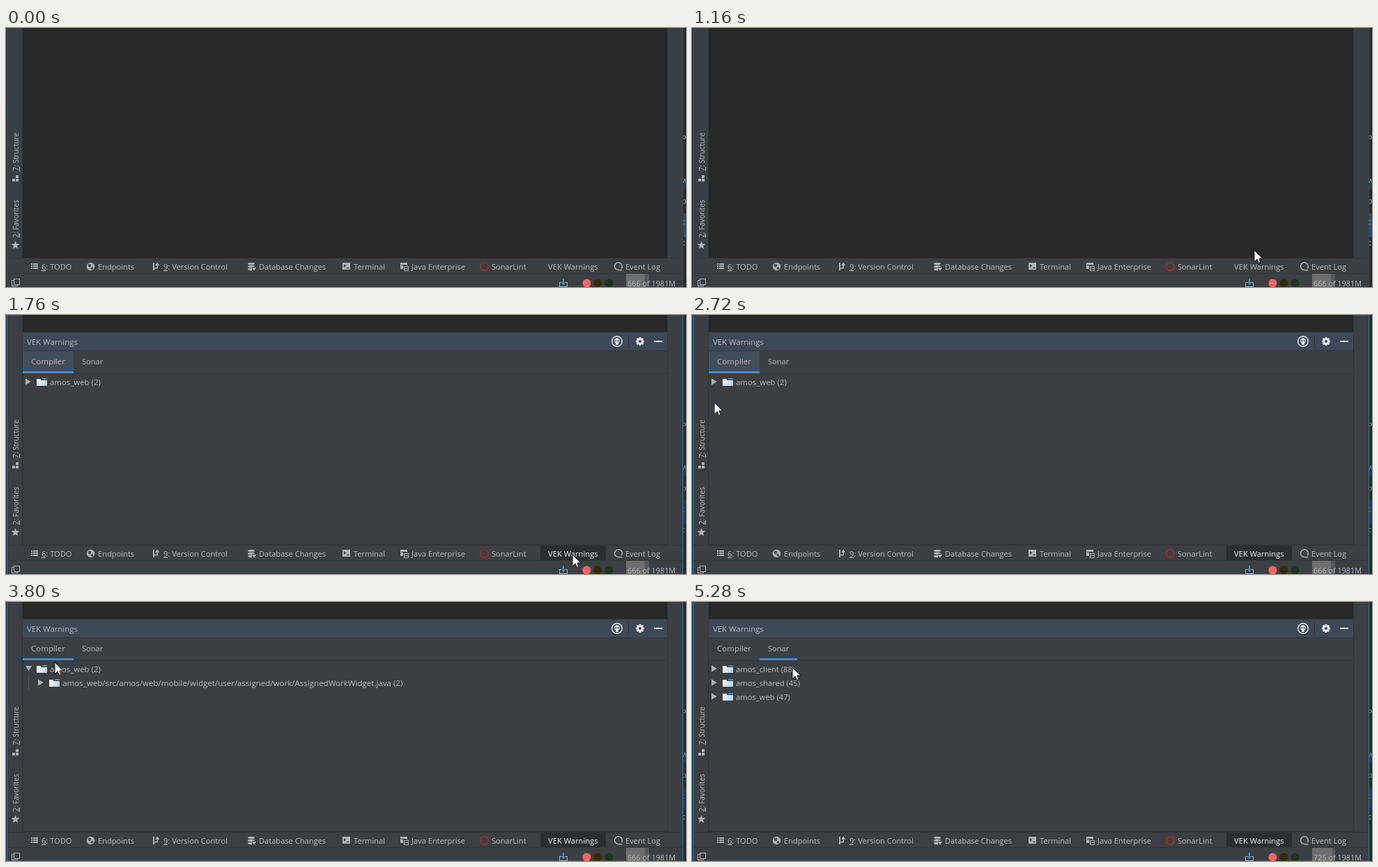
Recreate the animation shown at these times as an HTML page with a canvas. Size 976 by 373 pixels, loop 5400 ms.

```html
<!DOCTYPE html>
<html lang="en">
<head>
<meta charset="utf-8">
<title>Tool window demo</title>
<style>
  html, body { margin: 0; width: 100%; height: 100%; overflow: hidden; background: #282828; }
  canvas { display: block; width: 976px; height: 373px; }
</style>
</head>
<body>
<canvas id="stage" width="976" height="373"></canvas>
<script>
const ctx = document.getElementById('stage').getContext('2d');
const LOOP = 5400, STEP = 80;
const PANEL = '#3c3f41', EDITOR = '#282828', LINE = '#323436', HEADER = '#3c4856';
const TEXT = '#bbbbbb', ICON = '#afb1b3', LIGHT = '#e6e8ea', BLUE = '#3592c4';
const TITLE = 'VEK Warnings';

// What happens when
const APPEAR = 600, PRESS = 1680, SHOW = 1760, EXPAND = 3600, COUNT = 4560, SWITCH = 4800;
const clicks = [PRESS, EXPAND - STEP, SWITCH - STEP];

// Pointer moves: start, end and where each one leads
const entry = [950, 152];
const moves = [
  [520, 1080, 806, 308],
  [1080, 1160, 807, 320],
  [1160, 1520, 813, 345],
  [2160, 2720, 32, 126],
  [2720, 3000, 40, 93],
  [3080, 3240, 34, 94],
  [3560, 3800, 70, 87],
  [3800, 4000, 100, 71],
  [4040, 4280, 119, 65],
  [4880, 5120, 43, 88],
  [5120, 5280, 144, 94]
];

const smooth = u => u * u * (3 - 2 * u);

function pointerAt(t) {
  let [x, y] = entry;
  for (const [start, end, toX, toY] of moves) {
    if (t < start) break;
    const held = Math.floor((t - start) / STEP) * STEP;
    const u = t >= end ? 1 : smooth(held / (end - start));
    x += (toX - x) * u;
    y += (toY - y) * u;
  }
  return [Math.round(x), Math.round(y)];
}

function rect(x, y, w, h, color) {
  ctx.fillStyle = color;
  ctx.fillRect(x, y, w, h);
}

function frame(x, y, w, h, color) {
  ctx.strokeStyle = color;
  ctx.lineWidth = 1;
  ctx.strokeRect(x + 0.5, y + 0.5, w - 1, h - 1);
}

function disc(x, y, r, color, flat = 1) {
  ctx.fillStyle = color;
  ctx.beginPath();
  ctx.ellipse(x, y, r, r * flat, 0, 0, Math.PI * 2);
  ctx.fill();
}

function ring(x, y, r, color, from = 0, to = Math.PI * 2) {
  ctx.strokeStyle = color;
  ctx.lineWidth = 1.5;
  ctx.beginPath();
  ctx.arc(x, y, r, from, to);
  ctx.stroke();
}

function poly(points, color) {
  ctx.fillStyle = color;
  ctx.beginPath();
  points.forEach(p => ctx.lineTo(...p));
  ctx.closePath();
  ctx.fill();
}

// Triangle of half width r with its tip r ahead, turned by quarter turns
function triangle(x, y, r, turns, color) {
  at(x, y, turns * Math.PI / 2, () => poly([[0, -r], [0, r], [r * 1.6, 0]], color));
}

function at(x, y, angle, paint) {
  ctx.save();
  ctx.translate(x, y);
  ctx.rotate(angle);
  paint();
  ctx.restore();
}

// A leading shortcut digit is underlined
function label(text, x, y, size = 11.1, color = TEXT) {
  ctx.font = size + 'px "Open Sans", "Noto Sans", sans-serif';
  ctx.fillStyle = color;
  ctx.fillText(text, x, y);
  if (/^\d:/.test(text)) rect(x, y + 1, 6, 1, color);
}

function sideLabel(text, y) {
  at(18, y, -Math.PI / 2, () => label(text, 0, 0, 10.2));
}

function star(x, y, r) {
  poly(Array.from({ length: 10 }, (_, i) => {
    const a = (i / 5 - 0.5) * Math.PI, d = i % 2 ? r * 0.42 : r;
    return [x + d * Math.cos(a), y + d * Math.sin(a)];
  }), ICON);
}

function drawWindow(active) {
  const border = active ? '#2f78ab' : '#45494b';
  rect(0, 0, 976, 373, '#2b2b2b');
  if (!active) rect(0, 112, 1, 20, '#12335c');
  rect(971, 216, 5, 16, '#2a384b');
  rect(971, 267, 5, 34, active ? '#243755' : '#2d4a70');
  [...'Plwbtc'].forEach((s, i) => label(s, 970, 163 + i * 30, 11, active ? '#7f8790' : '#a0a4a8'));

  rect(1, 0, 971, 373, border);
  rect(2, 0, 969, 373, PANEL);
  rect(23, 0, 927, 332, LINE);
  rect(24, 0, 925, 331, EDITOR);

  sideLabel('7: Structure', 206);
  rect(14, 212, 4, 4, ICON);
  rect(9, 217, 4, 4, ICON);
  rect(14, 217, 4, 4, ICON);
  sideLabel('2: Favorites', 302);
  star(13.5, 313, 6.3);
}

function listIcon(x) {
  for (let y = 339; y < 348; y += 3) {
    rect(x, y, 2, 2, ICON);
    rect(x + 3, y, 7, 2, ICON);
  }
}

function globeIcon(x) {
  disc(x, 343.5, 5.8, ICON);
  disc(x - 1.5, 342, 2.4, '#505355');
  disc(x + 2, 346, 2, '#505355');
}

function branchIcon(x) {
  rect(x, 338, 2, 11, ICON);
  rect(x, 345, 7, 1.5, ICON);
  rect(x + 5.5, 340, 1.5, 6, ICON);
  triangle(x + 6.2, 342, 3, -1, ICON);
}

function databaseIcon(x) {
  for (let y = 339.5; y < 349; y += 4) disc(x, y, 5, ICON, 0.36);
  rect(x + 1, 344, 6, 6, PANEL);
  triangle(x + 4, 345, 3, 1, ICON);
}

function terminalIcon(x) {
  rect(x, 338, 11, 10, ICON);
  triangle(x + 2, 342.5, 2.2, 0, PANEL);
  rect(x + 6, 345, 4, 1, PANEL);
}

function enterpriseIcon(x) {
  rect(x, 338, 10, 9, ICON);
  rect(x + 1, 341, 8, 1, PANEL);
  rect(x + 4, 342, 8, 8, PANEL);
  frame(x + 5, 343, 7, 7, ICON);
  rect(x + 5, 346, 7, 1, ICON);
}

function bubbleIcon(x) {
  ring(x, 343.2, 5.4, ICON, Math.PI / 2, Math.PI * 2.2);
  rect(x, 348, 5.5, 1.4, ICON);
}

function drawBar(t) {
  const used = t < COUNT ? 666 : 725;
  rect(2, 331, 969, 1, LINE);
  rect(2, 353, 969, 1, LINE);
  if (t >= PRESS) rect(767, 332, 94, 21, t < SHOW ? '#343638' : '#2b2d2f');

  listIcon(36);
  globeIcon(121.5);
  branchIcon(211);
  databaseIcon(352);
  terminalIcon(483);
  enterpriseIcon(566);
  ring(686.5, 343.5, 5.8, '#a52a2d');
  bubbleIcon(879);

  const names = {
    '6: TODO': 51, 'Endpoints': 132, '9: Version Control': 226, 'Database Changes': 363,
    'Terminal': 499, 'Java Enterprise': 582, 'SonarLint': 697, 'Event Log': 889
  };
  for (const name in names) label(name, names[name], 348);
  label(TITLE, 778, 348, 11.2, t >= SHOW ? '#f0f0f0' : TEXT);

  frame(8, 363, 9, 9, ICON);
  rect(11, 361, 9, 9, PANEL);
  frame(11, 361, 9, 9, ICON);

  frame(794, 366, 12, 7, ICON);
  rect(797, 365, 6, 3, PANEL);
  rect(799, 361, 2, 6, BLUE);
  triangle(800, 366, 3, 1, BLUE);

  ['#ff6464', '#332b05', '#20331f'].forEach((c, i) => disc(833.5 + i * 16, 367.5, 6, c));

  rect(890, 354, 33, 19, '#555759');
  rect(890, 354, 2 + used * 0.0375, 19, '#6e6e6e');
  label(used + ' of 1981M', 892, 372, 10.85);
}

function folder(x, y) {
  const shade = ctx.createLinearGradient(x, y, x + 15, y + 10);
  shade.addColorStop(0, '#ffffff');
  shade.addColorStop(1, '#b4cde0');
  rect(x, y + 1, 6, 3, shade);
  rect(x, y + 3, 15, 8, shade);
  rect(x + 8, y, 7, 2, '#4a8fc0');
}

function row(text, index, depth = 0, open = false, size = 11.2) {
  const x = 28 + depth * 18, y = 96 + index * 20;
  if (open) triangle(x + 4.5, y - 4, 4.6, 1, ICON);
  else triangle(x, y, 4.8, 0, ICON);
  folder(x + 16, y - 5);
  label(text, x + 35, y + 5, size);
}

function gear(x, y) {
  for (let i = 0; i < 4; i++) {
    at(x, y, i * Math.PI / 4, () => rect(-1.5, -6, 3, 12, LIGHT));
  }
  disc(x, y, 4.6, LIGHT);
  disc(x, y, 2, HEADER);
}

function skull(x, y) {
  ring(x, y, 7.3, LIGHT);
  disc(x, y - 1, 3.8, LIGHT);
  rect(x - 2, y + 1, 4, 4, LIGHT);
  for (const side of [-1, 1]) disc(x + side * 1.6, y - 0.7, 1.1, HEADER);
}

function drawPanel(t) {
  const sonar = t >= SWITCH, open = t >= EXPAND;
  rect(24, 24, 925, 307, LINE);
  rect(24, 25, 925, 26, HEADER);
  rect(24, 52, 925, 32, PANEL);
  rect(25, 85, 924, 245, PANEL);

  label(TITLE, 30, 43, 11.4);
  skull(877, 38);
  rect(893, 29, 1, 18, LINE);
  gear(910, 38);
  rect(930, 37, 12, 2, LIGHT);

  if (t < EXPAND - STEP) rect(24, 52, 73, 29, '#414d5a');
  rect(sonar ? 97 : 24, 81, sonar ? 54 : 73, 3, '#4a88c7');
  label('Compiler', 36, 71, 11.5);
  label('Sonar', 109, 71);

  if (sonar) {
    ['amos_client (88)', 'amos_shared (45)', 'amos_web (47)'].forEach((s, i) => row(s, i));
    return;
  }
  row('amos_web (2)', 0, 0, open, 11.4);
  if (open) {
    rect(32, 106, 1, 21, '#55585a');
    row('amos_web/src/amos/web/mobile/widget/user/assigned/work/AssignedWorkWidget.java (2)', 1, 1, false, 11.54);
  }
}

function drawPointer(t) {
  const [x, y] = pointerAt(t);
  if (clicks.some(c => t >= c && t < c + STEP)) disc(x - 1, y - 1, 12, 'rgba(214, 204, 22, 0.82)');
  at(x, y, 0, () => {
    poly([[0, 0], [0, 17], [4, 13], [6.5, 18.5], [9, 17.5], [7, 12], [12, 12]], '#ffffff');
    ctx.strokeStyle = '#111111';
    ctx.lineWidth = 1;
    ctx.stroke();
  });
}

function draw(t) {
  drawWindow(t >= PRESS);
  if (t >= SHOW) drawPanel(t);
  drawBar(t);
  if (t >= APPEAR) drawPointer(t);
}

const begin = performance.now();
function tick() {
  draw((performance.now() - begin) % LOOP);
  requestAnimationFrame(tick);
}
tick();
</script>
</body>
</html>
```
